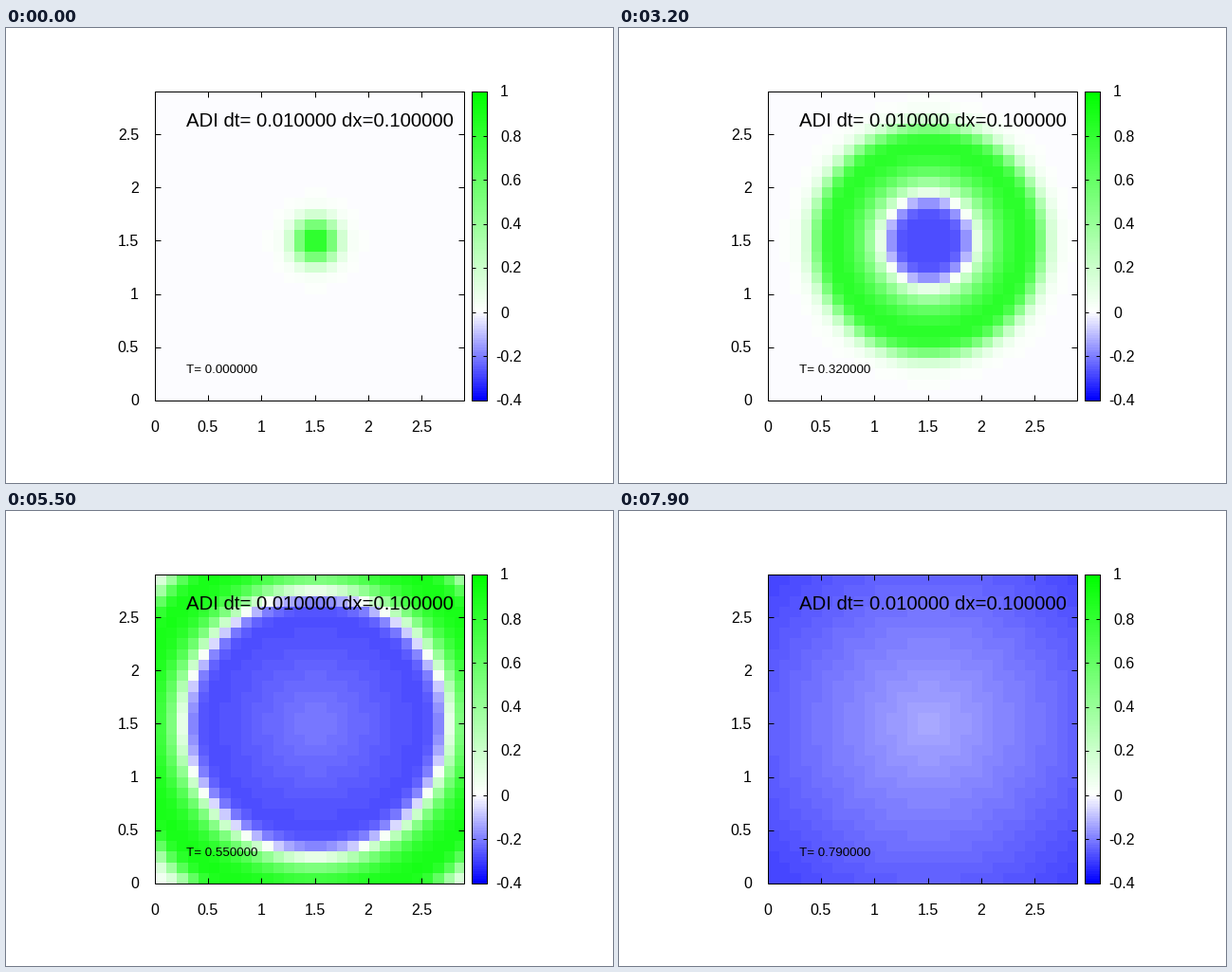
Write a matplotlib script that moves like this. It is 640 px wide and 480 px high and loops after 8000 ms.

```python
import numpy as np
import matplotlib.pyplot as plt
from matplotlib.animation import FuncAnimation

W, H, DPI = 640, 480, 100
FRAMES, INTERVAL = 80, 100
DT, DX, CELLS, CENTER = 0.01, 0.1, 29, 15
LEFT, RIGHT, TOP, BOTTOM = 157.5, 483.5, 67.5, 393.5
BAR_L, BAR_R = 491.5, 507.5
LOW, HIGH, SHADES = -0.4, 1.0, 128
PEAK, DIP = 0.95, 0.28

plt.rcParams["font.family"] = "Liberation Sans"

axis = np.arange(CELLS) + 0.5 - CENTER
RADIUS = np.hypot(*np.meshgrid(axis, axis))


def shade(u):
    """Blue below zero, white at zero, green above, in discrete steps."""
    level = np.floor((u - LOW) / (HIGH - LOW) * SHADES).clip(0, SHADES - 1)
    v = LOW + (HIGH - LOW) * level / (SHADES - 1)
    up, down = np.clip(v / HIGH, 0, 1), np.clip(v / LOW, 0, 1)
    return np.stack([1 - up - down, 1 - down, 1 - up], axis=-1)


def front_radius(t):
    return 1.7 + 23.5 * t + 14 * t**2


def back_radius(t):
    # Steady speed, with a fast start at the centre and a fast end in corners
    w = 0.055
    return 34 * (t - 0.19) + 4 * (np.exp((t - 0.79) / w)
                                  - np.exp((0.16 - t) / w))


def field(t):
    """Ring-shaped pulse with an undershoot that slowly recovers behind it."""
    rise = 1 / (1 + np.exp(1.77 * (RADIUS - front_radius(t))))
    d = RADIUS - back_radius(t)
    pulse = np.where(d > 0, PEAK * np.tanh((0.12 + 0.65 * t) * d),
                     DIP * np.tanh(d))
    passed = 0.215 + RADIUS / 37
    return pulse * rise + 0.29 * np.clip(t - passed - 0.06, 0, None)


fig = plt.figure(figsize=(W / DPI, H / DPI), dpi=DPI, facecolor="white")
ax = fig.add_axes([0, 0, 1, 1])


def line(xs, ys, cap="butt"):
    ax.plot(xs, ys, color="black", lw=72 / DPI, zorder=3, snap=False,
            solid_capstyle=cap, solid_joinstyle="miter")


def box(x0, x1):
    line([x0, x1, x1, x0, x0], [TOP, TOP, BOTTOM, BOTTOM, TOP], "projecting")


def ticks(x0, x1, y, size):
    line([x0, x0 + size], [y, y])
    line([x1, x1 - size], [y, y])


def label(x, y, text, px=16, ha="left"):
    return ax.text(x, y, text, fontsize=px * 72 / DPI, ha=ha,
                   va="baseline", color="black", zorder=4)


def picture(rgb, x0, x1, y0, y1):
    return ax.imshow(rgb, extent=(x0, x1, y1, y0), origin="lower",
                     interpolation="nearest", aspect="auto", zorder=1)


heat = picture(shade(field(0)), LEFT, RIGHT - 0.5, TOP + 0.5, BOTTOM)
bar = LOW + (HIGH - LOW) * (np.arange(SHADES) + 0.5) / SHADES
picture(shade(bar[:, None]), BAR_L, BAR_R, TOP, BOTTOM)
box(LEFT, RIGHT)
box(BAR_L, BAR_R)

for value in np.arange(6) / 2:
    step = (RIGHT - LEFT) * value / (CELLS * DX)
    x = np.floor(LEFT + step) + 0.5
    y = np.floor(BOTTOM - step) + 0.5
    label(x - 0.5, 425.5, f"{value:g}", ha="center")
    label(140, y + 5, f"{value:g}", ha="right")
    if value:
        line([x, x], [BOTTOM, BOTTOM - 6])
        line([x, x], [TOP, TOP + 6])
        ticks(LEFT, RIGHT, y, 6)

for value in np.arange(-2, 6) / 5:
    y = BOTTOM - (BOTTOM - TOP) * (value - LOW) / (HIGH - LOW)
    y = np.floor(y) + 0.5
    label(516.5 if value < 0 else 521, y + 5, f"{value:g}")
    ticks(BAR_L, BAR_R, y, 4)

label(190, 104, f"ADI dt= {DT:.6f} dx={DX:.6f}", px=20.35)
clock = label(190, 364, "T= 0.000000", px=13.33)

ax.set_xlim(0, W)
ax.set_ylim(H, 0)
ax.axis("off")


def update(i):
    t = i * DT
    heat.set_data(shade(field(t)))
    clock.set_text(f"T= {t:.6f}")
    return heat, clock


anim = FuncAnimation(fig, update, frames=FRAMES, interval=INTERVAL,
                     repeat=True, repeat_delay=0, blit=False)
plt.show()
```
